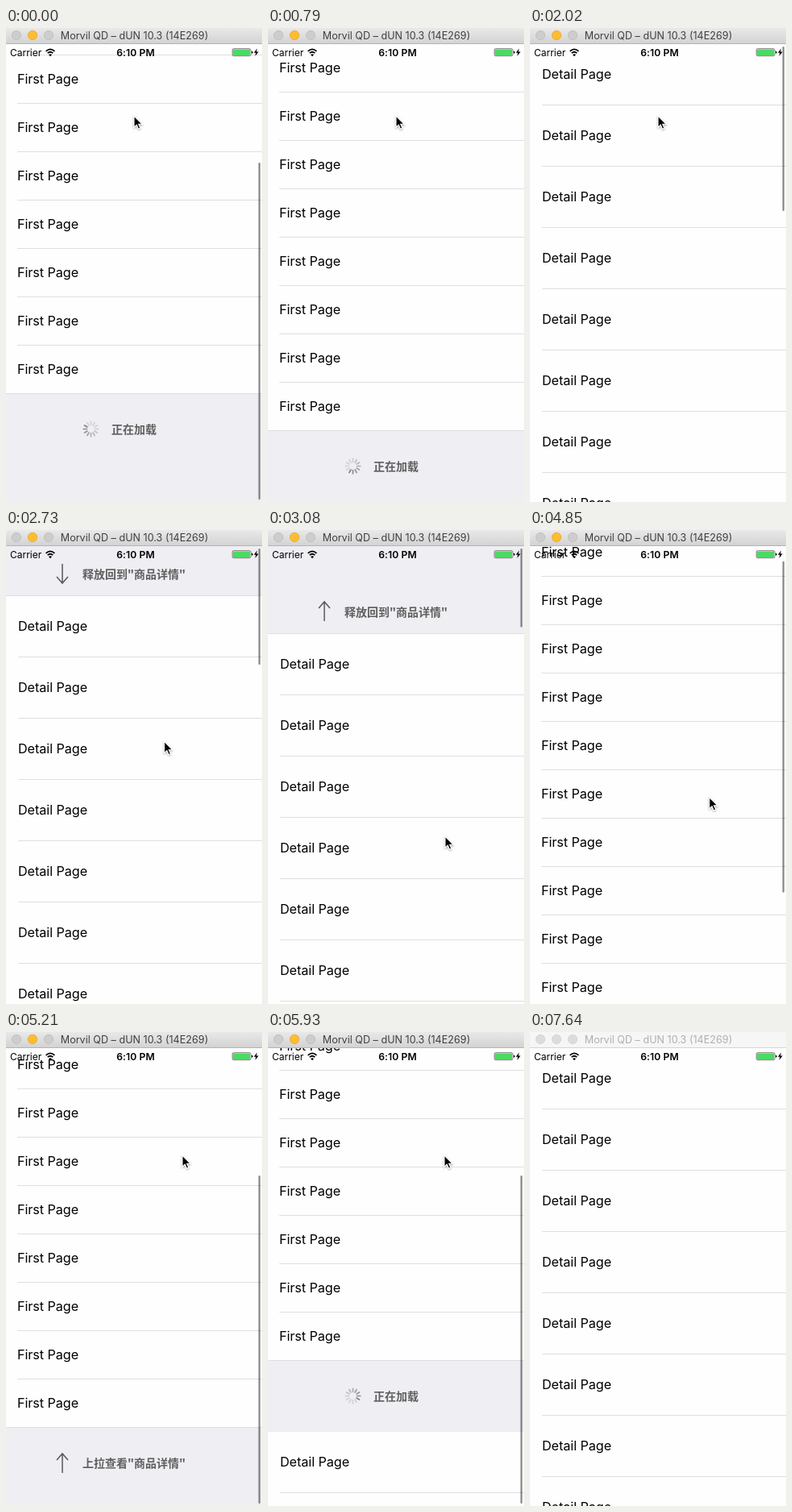
An HTML page for the animation above (7.74 s loop, 318 by 588 pixels).

```html
<!DOCTYPE html>
<html lang="en">
<head>
<meta charset="utf-8">
<title>Two page list</title>
<style>
html, body { margin: 0; width: 100%; height: 100%; overflow: hidden; background: #fefefe; }
svg { display: block; }
text { font-family: Inter, Roboto, sans-serif; }
.row { font-size: 16.2px; letter-spacing: -.07px; }
.hint { font: 700 14px "Noto Sans CJK SC", "Noto Sans CJK", sans-serif; fill: #5f5f5f; text-anchor: middle; }
.line { fill: #dfdfe2; }
.gray { fill: #eeeef3; }
.bar { fill: #000; fill-opacity: .42; }
</style>
</head>
<body>
<svg id="stage" width="318" height="588" viewBox="0 0 318 588">
  <defs>
    <clipPath id="page"><rect width="318" height="568"/></clipPath>
    <linearGradient id="chrome" x2="0" y2="1">
      <stop offset="0" stop-color="#e9e9e9"/><stop offset="1" stop-color="#d2d2d2"/>
    </linearGradient>
    <filter id="shade" x="-50%" y="-50%" width="200%" height="200%">
      <feDropShadow dx="0" dy="1" stdDeviation=".9" flood-opacity=".4"/>
    </filter>
  </defs>
  <rect width="318" height="588" fill="#fefefe"/>

  <g id="first">
    <rect class="gray" width="318" height="800"/>
    <g id="firstRows"></g>
    <g id="footLoad"><text class="hint" x="159" y="49.5">正在加载</text></g>
    <g id="footPull">
      <path d="M70 57V34M63 41l7-8 7 8" fill="none" stroke="#5a5a5a" stroke-width="1.5"/>
      <text class="hint" x="159" y="49.5">上拉查看"商品详情"</text>
    </g>
  </g>

  <g id="detail">
    <g clip-path="url(#page)">
      <rect class="gray" width="318" height="568"/>
      <g id="detailList">
        <rect width="318" height="700" fill="#fefefe"/>
        <g id="detailRows"></g>
        <g id="headLoad"><text class="hint" x="159" y="-21">正在返回</text></g>
        <g id="headPull">
          <path id="arrow" d="M70-39v24M63-23l7 8 7-8" fill="none" stroke="#5a5a5a" stroke-width="1.5"/>
          <text class="hint" id="headText" x="159" y="-21"></text>
        </g>
      </g>
    </g>
  </g>

  <rect id="bar" class="bar" x="313.5" width="2.5" rx="1.2"/>

  <g id="status">
    <text x="5" y="34.5" font-size="12">Carrier</text>
    <g fill="none" stroke="#000" stroke-width="1.7">
      <path d="M49.6 28.8q5.4-4.9 10.8 0M51.7 31.2q3.3-2.9 6.6 0"/>
    </g>
    <path d="M55 35.2l-2-2.1q2-1.7 4 0z"/>
    <text x="161" y="34.5" font-size="12.2" font-weight="600" letter-spacing=".1" text-anchor="middle">6:10 PM</text>
    <rect x="281.2" y="25.7" width="22.8" height="9" rx="1.6" fill="#fefefe" stroke="#222" stroke-width=".6"/>
    <rect x="282" y="26.5" width="21.2" height="7.4" rx=".9" fill="#4cd964"/>
    <path d="M305 28.6q1.5.2 1.5 1.6t-1.5 1.6z"/>
    <path d="M311.9 25.4l-4 5.3h2.5l-1 4.4 4.3-5.7h-2.6z"/>
  </g>

  <g id="title">
    <rect id="titleBg" width="318" height="20"/>
    <rect id="titleEdge" y="19" width="318" height="1"/>
    <g id="lights"></g>
    <text id="titleText" x="159.5" y="14" font-size="12.6" text-anchor="middle">Morvil QD – dUN 10.3 (14E269)</text>
  </g>

  <path id="cursor" d="M0 0V14.2L3.3 11.2 5.5 16.3 7.9 15.3 5.7 10.3H10.2Z" stroke="#fff" stroke-width="1.1" filter="url(#shade)"/>
</svg>

<script>
const LOOP = 7740, PAGE = 568;
const $ = id => document.getElementById(id);

function add(parent, tag, attrs, text) {
  const el = document.createElementNS('http://www.w3.org/2000/svg', tag);
  for (const k in attrs) el.setAttribute(k, attrs[k]);
  if (text) el.textContent = text;
  return parent.appendChild(el);
}
const set = (el, name, v) => el.setAttribute(name, v);
const move = (el, x, y) => set(el, 'transform', `translate(${x} ${y})`);
const show = (el, on) => set(el, 'visibility', on ? 'inherit' : 'hidden');

// progress from a to b, linear and eased
const ramp = (t, a, b) => Math.min(1, Math.max(0, (t - a) / (b - a)));
const ease = (t, a, b) => { const u = ramp(t, a, b); return u * u * (3 - 2 * u); };

function spinner(parent, cy) {
  const g = add(parent, 'g', { transform: `translate(105.5 ${cy})`, stroke: '#808080', 'stroke-width': 1.7, 'stroke-linecap': 'round' });
  return Array.from({ length: 12 }, (_, i) =>
    add(g, 'path', { d: 'M0-5.2V-9.2', transform: `rotate(${i * 30})` }));
}
function spin(spokes, t, phase) {
  const head = Math.floor(t * 12 / 1000 + phase);
  spokes.forEach((s, i) => {
    const lag = ((head - i) % 12 + 12) % 12;
    set(s, 'stroke-opacity', Math.max(.25, 1 - lag * .1));
  });
}

// list rows; y = 0 of the first page is its bottom line
const firstRows = $('firstRows'), detailRows = $('detailRows');
add(firstRows, 'rect', { y: -1200, width: 318, height: 1200, fill: '#fefefe' });
for (let k = 0; k < 13; k++) {
  const x = k ? 14 : 0, y = -60 * k;
  add(firstRows, 'rect', { class: 'line', x, y, width: 318 - x, height: 1 });
  add(firstRows, 'text', { class: 'row', x: 14, y: y - 24 }, 'First Page');
}
for (let k = 0; k < 9; k++) {
  const x = k ? 15 : 0, y = 76 * k;
  add(detailRows, 'rect', { class: 'line', x, y, width: 318 - x, height: 1 });
  add(detailRows, 'text', { class: 'row', x: 15, y: y + 44 }, 'Detail Page');
}
const lights = [13, 33, 53].map(cx => add($('lights'), 'circle', { cx, cy: 9, r: 5.7, 'stroke-width': .7 }));
const footSpin = spinner($('footLoad'), 44.5), headSpin = spinner($('headLoad'), -26);

const TICKS = [[0, 0], [1, 80], [18, 1570], [35, 3080], [54, 4760], [67, 5930], [80, 7070], [87, 7640], [88, LOOP]];
function interp(v, from, to) {
  let i = 1;
  while (i < TICKS.length - 1 && v >= TICKS[i][from]) i++;
  const a = TICKS[i - 1], b = TICKS[i];
  return a[to] + (v - a[from]) / (b[from] - a[from]) * (b[to] - a[to]);
}
const hold = t => interp(Math.floor(interp(t, 1, 0) + .1), 0, 1);

function pointer(t) {
  const down = ease(t, 2333, 3053), up = ease(t, 4716, 5166), out = ease(t, 6590, 7110);
  return [
    159 + 61 * down ** .85 + 3 * Math.sin(Math.PI * Math.sqrt(up)) - up + 88 * out,
    109 + 271 * down - 227 * up + 460 * out
  ];
}

function firstOffset(t) {
  if (t < 4000) return 300 + 46 * (1 - ramp(t, 0, 500)) ** 3;
  return 330 * ease(t, 4768, 5290) - 30 * ease(t, 5290, 5570);
}

function pullDown(t, y) {
  if (t < 2330 || t > 4300) return 0;
  const d = .55 * Math.max(0, y - 136), pull = d / (1 + d / PAGE);
  return t < 3760 ? pull : 54 + (pull - 54) * (1 - ramp(t, 3760, 4052)) ** 2;
}

function scrollBar(t, off, pull) {
  let top = 23, len = 204, alpha = 0;
  if (t < 800 || (t > 4740 && t < 5990)) {
    top = Math.min(23 + off * .72, t < 800 ? 167 : 178);
    len = Math.min(585, top + 411) - top;
    if (t < 800) len = 585 - top;
    alpha = t < 800 ? 1 - ramp(t, 450, 750) : 1;
  } else if ((t > 1700 && t < 2015) || (t > 5990 && t < 6185)) {
    alpha = 1;
  } else if (t > 2360 && t < 4100) {
    const back = t > 3760;
    len = back ? 193 - (pull - 54) : 206 - pull;
    alpha = back ? 1 - .7 * ramp(t, 3790, 4100) : 1;
  }
  const bar = $('bar');
  set(bar, 'y', top);
  set(bar, 'height', len);
  set(bar, 'opacity', alpha);
}

function chrome(active) {
  set($('titleBg'), 'fill', active ? 'url(#chrome)' : '#f6f6f6');
  set($('titleEdge'), 'fill', active ? '#b4b4b4' : '#d4d4d4');
  set($('titleText'), 'fill', active ? '#404040' : '#b0b0b0');
  lights.forEach((c, i) => {
    const lit = active && i === 1;
    set(c, 'fill', lit ? '#fdbd2f' : active ? '#cdcdcd' : '#dcdcdc');
    set(c, 'stroke', lit ? '#e3a32c' : active ? '#b9b9b9' : '#d0d0d0');
  });
}

function draw(t) {
  const [cx, cy] = pointer(t);
  const off = firstOffset(t), pull = pullDown(t, cy);
  const slide = Math.round(PAGE * (ease(t, 1580, 1838) - ease(t, 4010, 4290) + ease(t, 5863, 6125)));

  move($('first'), 0, Math.round(799 - off) - slide);
  const loading = t < 4000 || t > 5280;
  show($('footLoad'), loading);
  show($('footPull'), !loading);
  spin(footSpin, t, t < 4000 ? 10 : 17);

  move($('detail'), 0, 588 - slide);
  move($('detailList'), 0, Math.round(pull) - 1);
  const back = t > 3760;
  show($('headLoad'), back);
  show($('headPull'), !back);
  spin(headSpin, t, 10);
  $('headText').textContent = (pull > 54 ? '释放' : '下拉') + '回到"商品详情"';
  set($('arrow'), 'transform', `rotate(${-180 * ease(t, 2735, 2985)} 70 -27)`);

  scrollBar(t, off, pull);
  chrome(t < 7630);
  move($('cursor'), cx.toFixed(1), cy.toFixed(1));
  show($('cursor'), t < 7060);
}

const start = performance.now();
function frame() {
  draw(hold((performance.now() - start) % LOOP));
  requestAnimationFrame(frame);
}
frame();
</script>
</body>
</html>
```
